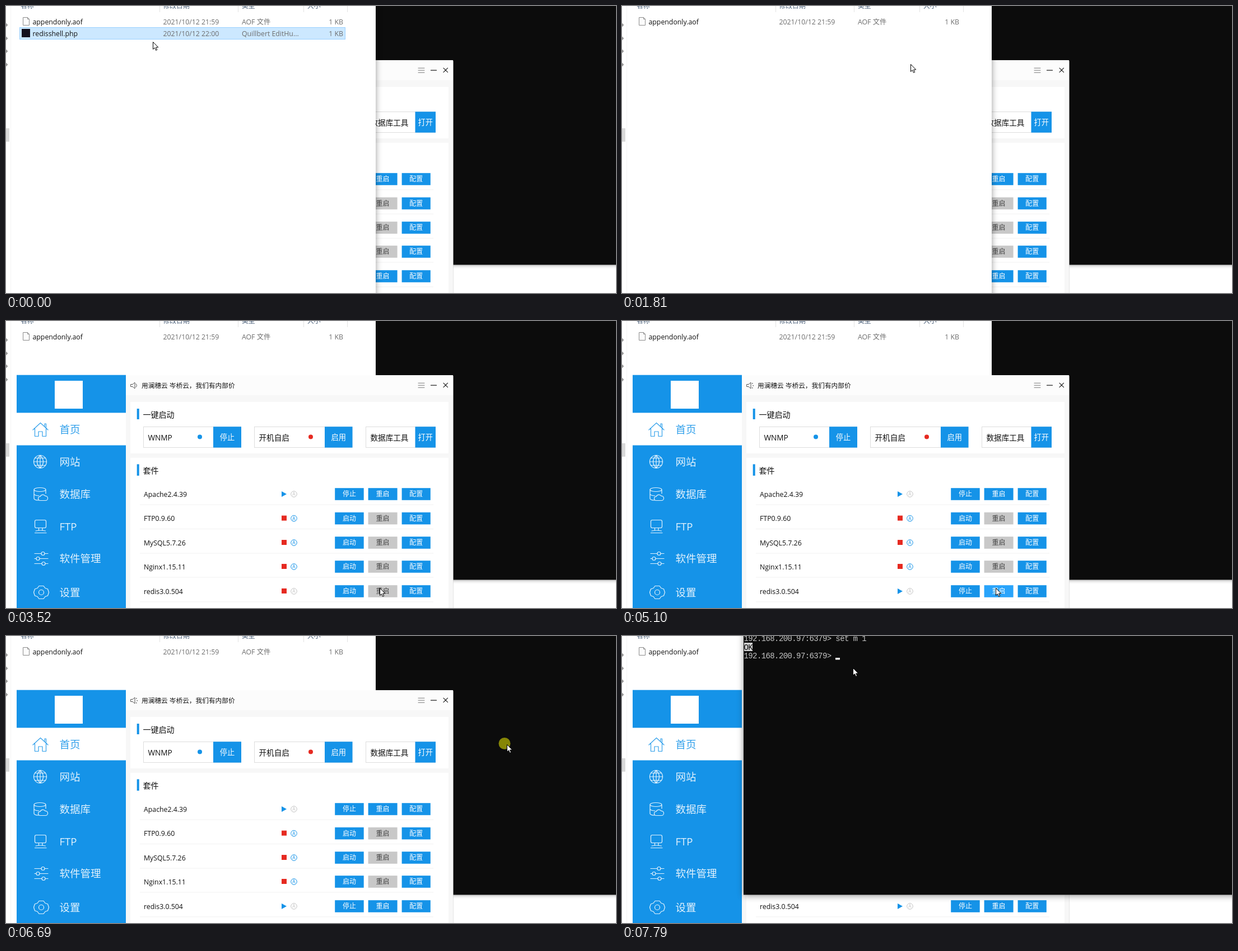
An HTML page that plays this animation: 1089x514 px, repeating every 8000 ms.

```html
<!DOCTYPE html>
<html lang="zh-CN">
<head>
<meta charset="utf-8">
<style>
html, body { margin: 0; width: 100%; height: 100%; overflow: hidden; background: #fff; }
svg { display: block; width: 1089px; height: 514px; }
text { font-family: "Open Sans", "Noto Sans CJK SC", "Noto Sans CJK JP", sans-serif; white-space: pre; }
.mono { font-family: "Liberation Mono", monospace; letter-spacing: -.6px; }
.line { fill: none; stroke-width: 1.2; stroke-linejoin: round; stroke-linecap: round; }
.thin { stroke-width: 1; }
.menu { opacity: .88; }
.frame { filter: drop-shadow(0 1px 3px rgba(0,0,0,.35)); }
.active .frame { filter: drop-shadow(0 2px 6px rgba(0,0,0,.4)); }
#panel .frame { filter: drop-shadow(0 0 .7px rgba(0,0,0,.35)); }
</style>
</head>
<body>
<svg id="stage" viewBox="0 0 1089 514">
  <g id="windows">
    <g id="term"></g>
    <g id="panel"></g>
    <g id="files"></g>
  </g>
  <circle id="click" r="10.5" fill="#ff0" fill-opacity=".5"/>
  <path id="mouse" d="M0 0V13L3 10.3 5 14.9 7.2 14 5.2 9.5H9.3Z" fill="#fff" stroke="#000"/>
</svg>
<script>
const $ = id => document.getElementById(id);
const BLUE = '#1593e8', RED = '#e62a21', GREY = '#c8c8c8';

const rect = (x, y, w, h, fill, more = '') =>
  `<rect x="${x}" y="${y}" width="${w}" height="${h}" fill="${fill}" ${more}/>`;
const text = (x, y, s, size = 12.3, fill = '#111', more = '') =>
  `<text x="${x}" y="${y}" font-size="${size}" fill="${fill}" ${more}>${s}</text>`;
const line = (d, stroke, kind = '', more = '') =>
  `<path class="line ${kind}" d="${d}" stroke="${stroke}" ${more}/>`;
const mid = 'text-anchor="middle"';
const button = (x, y, w, h, label, size, fill = BLUE, ink = '#fff') =>
  rect(x, y, w, h, fill) + text(x + w / 2, y + h / 2 + size * .37, label, size, ink, mid);

// Terminal
const prompt = '192.168.200.97:6379&gt; ';
const mono = (y, s, fill = '#c4c4c4') => text(217.5, y, s, 14, fill, 'class="mono"');
$('term').innerHTML =
  rect(217, -30, 900, 493.5, '#0c0c0c', 'class="frame"') +
  mono(9, prompt + 'set m 1') +
  rect(218, 12, 15, 15, '#d4d4d4') + mono(24.5, 'OK', '#0c0c0c') +
  mono(40, prompt) + rect(381, 39, 8, 3.5, '#f2f2f2', 'id="caret"');

// Control panel
const menu = [
  [194, '首页', 'M48 195L61.500 182.500 75 195M51.500 192.500V206.500H58V198H65V206.500H71.500V192.500M69 189V184H71.500V191'],
  [252, '网站', 'M49.500 252a11.500 11.500 0 1 0 23 0a11.500 11.500 0 1 0-23 0M49.500 252H72.500M61 240.500V263.500M61 240.500q-11 11.500 0 23q11-11.500 0-23M52 245.500H70M52 258.500H70'],
  [310, '数据库', 'M50 302a10.500 3.500 0 1 0 21 0a10.500 3.500 0 1 0-21 0V318q1 3 8 3M71 302V309M50 310q2 3 9 3M61 321.500a3.500 3.500 0 0 1 0-7a5 5 0 0 1 9-1a4 4 0 0 1 1 8Z'],
  [368, 'FTP', 'M54 356.500H69a2.500 2.500 0 0 1 2.500 2.500V368a2.500 2.500 0 0 1-2.500 2.500H54a2.500 2.500 0 0 1-2.500-2.500V359a2.500 2.500 0 0 1 2.500-2.500M58.500 371V375M65 371V375M51.500 379.500H72M53 376q8.500-2 17.500 0'],
  [425, '软件管理', 'M51 416.500H63M69 416.500H75M63 416.500a3 3 0 1 0 6 0a3 3 0 1 0-6 0M51 425.500H54M60 425.500H75M54 425.500a3 3 0 1 0 6 0a3 3 0 1 0-6 0M51 434.500H64M70 434.500H75M64 434.500a3 3 0 1 0 6 0a3 3 0 1 0-6 0'],
  [486, '设置', 'M59 474.500H67L70 478.500 74.500 480 76.500 486 74.500 492 70 493.500 67 497.500H59L56 493.500 51.500 492 49.500 486 51.500 480 56 478.500ZM58.500 486a4.500 4.500 0 1 0 9 0a4.500 4.500 0 1 0-9 0']
].map(([y, s, d], i) => {
  const ink = i ? '#fff' : BLUE;
  return line(d, ink, 'menu') + text(95.5, y + 7, s, 18.5, ink, 'class="menu"');
}).join('');

const launch = (x, w, label, bw, act) =>
  rect(x + .5, 189.5, w - 1, 37, '#fff', 'stroke="#ddd"') +
  text(x + 8.5, 213.5, label, 13.6) +
  button(x + w - bw, 189.3, bw, 37.4, act, 13.3);

function service(name, y, on, auto) {
  const mark = on
    ? `<path d="M492 ${y - 5}L501 ${y}L492 ${y + 5}Z" fill="${BLUE}"/>`
    : rect(492, y - 5, 9, 9, RED);
  const ink = auto ? BLUE : '#c4c4c4', top = y - 10.8, h = 21.6;
  return text(246, y + 4.5, name) + mark +
    `<circle cx="514" cy="${y}" r="5.300" fill="none" stroke="${ink}"/>` +
    text(514, y + 3, 'A', 8.5, ink, mid) +
    button(587.2, top, 51.5, h, on ? '停止' : '启动', 12) +
    `<g class="again">${button(647 - .4, top, 52, h, '重启', 12, on ? BLUE : GREY, on ? '#fff' : '#444')}</g>` +
    button(706.6, top, 51.2, h, '配置', 12) +
    rect(239, y + 18.5, 524, 1, '#f2f2f2');
}

$('panel').innerHTML =
  rect(19, 97, 779.5, 450, '#f7f7f7', 'rx="2" class="frame"') +
  rect(214, 97, 584, 36, '#fcfcfc') +
  rect(19, 96.7, 195, 450, BLUE) + rect(19, 164.4, 195, 58.2, '#fff') +
  rect(87, 107, 50, 50, '#fff') + menu +
  line('M223 113.500H226L230 110V121L226 117.500H223Z', '#555', 'thin') +
  line('M232 112.500q3 3 0 6', '#555', 'thin', 'id="wave"') +
  `<g id="dots">${rect(232, 111, 1.5, 1.5, '#555')}${rect(233.5, 115, 1.5, 1.5, '#555')}${rect(232, 119, 1.5, 1.5, '#555')}</g>` +
  text(242, 119.5, '用澜穗云 岑桥云，我们有内部价', 11.7) +
  line('M736 111.200H747M736 115.200H747M736 119.200H747', '#777', 'thin') +
  line('M758.500 115.200H768.500', '#222') + line('M781 111.200L788.500 118.700M788.500 111.200L781 118.700', '#222') +
  rect(222, 145, 568, 92, '#fff') + rect(222, 245, 568, 300, '#fff') +
  rect(233.7, 157, 4, 19, BLUE) + text(244.5, 172.5, '一键启动', 14) +
  rect(233.7, 256.5, 4, 20.5, BLUE) + text(244.5, 272.5, '套件', 14) +
  launch(245, 175, 'WNMP', 50, '停止') + launch(443, 175.5, '开机自启', 49.5, '启用') +
  launch(642, 125, '数据库工具', 36.5, '打开') +
  `<circle cx="346" cy="207.500" r="4" fill="${BLUE}"/><circle cx="544" cy="207.500" r="4" fill="${RED}"/>` +
  service('Apache2.4.39', 310, true, false) + service('FTP0.9.60', 353.5, false, true) +
  service('MySQL5.7.26', 397, false, true) + service('Nginx1.15.11', 440, false, true) +
  `<g id="running">${service('redis3.0.504', 484, true, false)}</g>` +
  `<g id="stopped">${service('redis3.0.504', 484, false, false)}</g>`;

// File list
const dim = '#6d6d6d';
const fileRow = (y, name, date, type) =>
  text(47.5, y, name) + text(280.5, y, date, 12.3, dim) + text(421, y, type, 12.3, dim) +
  text(602, y, '1 KB', 12.3, dim, 'text-anchor="end"');
$('files').innerHTML =
  rect(-30, -30, 690, 580, '#fff', 'class="frame"') + rect(8, 0, 1, 514, '#f5f5f5') +
  [34, 58, 81, 105].map(y => `<path d="M0 ${y - 3.5}L3.500 ${y}L0 ${y + 3.5}Z" fill="#999"/>`).join('') +
  rect(0, 219, 6, 24, '#d9d9d9') +
  [[26, '名称'], [280.5, '修改日期'], [421, '类型'], [538, '大小']].map(([x, s]) => text(x, 3.5, s, 11.8, '#4c607a')).join('') +
  [274, 414, 531, 609].map(x => rect(x, 0, 1, 11, '#e2e2e2')).join('') +
  '<path d="M30.500 20.500H38.500L41.500 23.500V34.500H30.500ZM38.500 20.500V23.500H41.500" fill="#fbfbfb" stroke="#8c8c8c"/>' +
  fileRow(32.5, 'appendonly.aof', '2021/10/12 21:59', 'AOF 文件') +
  `<g id="doomed">${rect(24.5, 38.5, 581, 21, '#cce8ff', 'id="pick"')}${rect(28, 41, 15, 15, '#12101c')}` +
  fileRow(53.5, 'redisshell.php', '2021/10/12 22:00', 'Quillbert EditHu...') + '</g>';

// Mouse track: time, x, y, eased
const track = [
  [0, 262, 64], [1330, 262, 64], [1810, 515, 104], [2090, 690, 153], [2160, 692, 153],
  [2890, 692, 153], [3450, 667, 478, 1], [5370, 667, 478], [6130, 686, 466], [6690, 895, 193, 1],
  [6760, 895, 193], [6970, 778, 142], [7520, 411, 57], [7700, 411, 57], [7720, 412, 57], [8000, 412, 57]
];
function mouseAt(t) {
  const i = track.findIndex(p => p[0] > t);
  const [t0, x0, y0] = track[i - 1], [t1, x1, y1, eased] = track[i];
  let k = (t - t0) / (t1 - t0);
  if (eased) k = k * k * (3 - 2 * k);
  return [x0 + (x1 - x0) * k, y0 + (y1 - y0) * k];
}

const within = (t, a, b) => t >= a && t < b;
const show = (id, on) => $(id).style.display = on ? '' : 'none';
const again = document.querySelector('#running .again rect');
const STEP = 68.5;
let stack = '';

function draw(t) {
  const order = t < 2890 ? 'term panel files' : t < 6740 ? 'term files panel' : 'files panel term';
  if (order !== stack) {
    order.split(' ').forEach(id => $('windows').append($(id)));
    stack = order;
  }
  const asking = within(t, 130, 1060);
  const front = order.split(' ')[2];
  for (const id of ['term', 'panel', 'files'])
    $(id).setAttribute('class', id === front && !asking ? 'active' : '');

  show('doomed', t < 1130);
  $('pick').setAttribute('fill', asking ? '#d9d9d9' : '#cce8ff');
  $('pick').setAttribute('stroke', asking ? '#d9d9d9' : '#99d1ff');

  const stopped = within(t, 3520, 5100);
  show('running', !stopped);
  show('stopped', stopped);

  const loud = (t + 660) % 1660 < 830;
  show('dots', loud);
  show('wave', !loud);
  show('caret', !within(t, 7040, 7500));

  const held = t < 1330 ? t : t - (t - 1330) % STEP;
  const [x, y] = mouseAt(held).map(Math.round);
  $('mouse').setAttribute('transform', `translate(${x + .5} ${y + .5})`);
  again.setAttribute('fill', y > 473 && y < 495 ? '#29a4fb' : BLUE);
  show('click', within(t, 2890, 2960) || within(t, 3450, 3520) || within(t, 6685, 6760));
  $('click').setAttribute('transform', `translate(${x - 4} ${y - 1.5})`);
}

const start = performance.now();
function tick() {
  draw((performance.now() - start) % 8000);
  requestAnimationFrame(tick);
}
tick();
</script>
</body>
</html>
```
